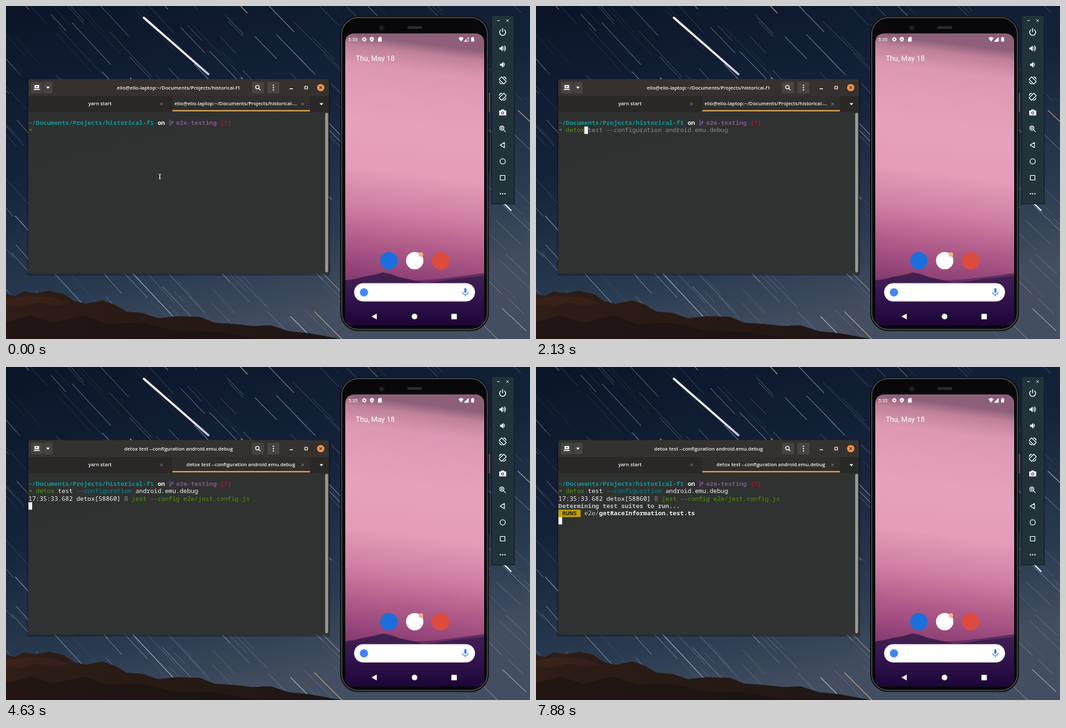
Animation of 800 by 510 pixels, one loop 8 s. Source, as an HTML page:

```html
<!DOCTYPE html>
<html lang="en">
<head>
<meta charset="utf-8">
<title>Terminal and emulator</title>
<style>
  html, body { margin: 0; width: 100%; height: 100%; overflow: hidden; background: #14243a; }
  svg { display: block; width: 800px; height: 510px; }
  text { white-space: pre; }
  .ui { font: 600 7.55px "Open Sans", "Noto Sans", sans-serif; fill: #f4f2f0; text-anchor: middle; }
  .term { font: 9.39px "Noto Sans Mono", "DejaVu Sans Mono", monospace; fill: #f2f2f2; }
  .phone { font-family: Roboto, sans-serif; fill: #fff; }
  .b { font-weight: 700; }
  .path { fill: #0a9a9c; font-weight: 700; }
  .cyan { fill: #06888c; }
  .green { fill: #4e9a06; }
  .red { fill: #cc1414; }
  .git { fill: #83568d; font-weight: 600; }
  .flag { fill: #bd141b; font-weight: 700; }
  .dim { fill: #8a8b8a; }
  .soft { fill: #c3c4c3; }
  .dark { fill: #22200c; }
  .line { fill: none; stroke: #fff; stroke-width: 1.1; stroke-linecap: round; stroke-linejoin: round; }
</style>
</head>
<body>
<svg viewBox="0 0 800 510" xmlns="http://www.w3.org/2000/svg">
  <defs>
    <linearGradient id="sky" x1="0" y1="0" x2="0.4" y2="1">
      <stop offset="0" stop-color="#0a1527"/>
      <stop offset=".45" stop-color="#14233a"/>
      <stop offset=".8" stop-color="#2a3b51"/>
      <stop offset="1" stop-color="#434e60"/>
    </linearGradient>
    <linearGradient id="rock" x1="0" y1="0" x2="1" y2="0">
      <stop offset="0" stop-color="#2f1d16"/>
      <stop offset=".5" stop-color="#271914"/>
      <stop offset="1" stop-color="#1b1516"/>
    </linearGradient>
    <linearGradient id="wall" x1="0" y1="0" x2="-.06" y2="1">
      <stop offset="0" stop-color="#8d5f78"/>
      <stop offset=".035" stop-color="#c08199"/>
      <stop offset=".1" stop-color="#dc98b2"/>
      <stop offset=".3" stop-color="#e7a2bb"/>
      <stop offset=".45" stop-color="#e49cb7"/>
      <stop offset=".58" stop-color="#d080a3"/>
      <stop offset=".7" stop-color="#b05c8a"/>
      <stop offset=".8" stop-color="#924377"/>
      <stop offset=".88" stop-color="#71346a"/>
    </linearGradient>
    <linearGradient id="hill" x1="0" y1="0" x2="0" y2="1">
      <stop offset="0" stop-color="#43224f"/>
      <stop offset=".4" stop-color="#351650"/>
      <stop offset="1" stop-color="#1d0537"/>
    </linearGradient>
    <linearGradient id="meteor" gradientUnits="userSpaceOnUse" x1="210" y1="17" x2="310" y2="105">
      <stop offset="0" stop-color="#fff"/>
      <stop offset=".7" stop-color="#f3eefb"/>
      <stop offset="1" stop-color="#c5c0da"/>
    </linearGradient>
    <clipPath id="screen"><rect x="518" y="42" width="212" height="447" rx="13"/></clipPath>
  </defs>

  <rect width="800" height="510" fill="url(#sky)"/>
  <g id="trails" stroke-linecap="round"></g>
  <path d="M210.500 18L309 104.500" stroke="url(#meteor)" stroke-width="3.2" stroke-linecap="round"/>
  <path d="M745 287L771 313" stroke="#e6e6f2" stroke-width="2" stroke-linecap="round"/>
  <path fill="url(#rock)" d="M0 441L14 444L27 437L45 440L66 436L88 441L104 452L122 456L147 451L165 457L184 468L208 470L232 478L262 475L296 476L318 485L349 487L376 490L404 489L432 498L462 501L490 506L512 510H0Z"/>
  <path fill="#452a1d" opacity=".4" d="M0 449L30 444L70 446L98 455L76 459L49 454L25 461L0 458Z"/>
  <path fill="#120f13" opacity=".45" d="M0 484L38 474L72 485L118 474L155 487L205 485L258 497L325 499L384 510H0Z"/>

  <!-- Terminal window -->
  <rect x="32" y="112" width="463" height="301" rx="4" opacity=".25"/>
  <path d="M34 410V116q0-4 4-4H489q4 0 4 4V410Z" fill="#313231" opacity=".965"/>
  <path d="M34 138V116q0-4 4-4H489q4 0 4 4V138Z" fill="#34312f"/>
  <rect x="34" y="138" width="459" height="24.500" fill="#2a2827"/>
  <rect x="254" y="138" width="210" height="23" fill="#302e2c"/>
  <rect x="254" y="159.500" width="210" height="1.800" fill="#f5b665"/>
  <g fill="#464341">
    <rect x="38" y="116" width="18" height="18" rx="2"/>
    <rect x="57" y="116" width="14" height="18" rx="2"/>
    <rect x="375.500" y="116" width="18.500" height="18" rx="2"/>
    <rect x="399" y="116" width="18.500" height="18" rx="2"/>
  </g>
  <g fill="#fff">
    <path d="M43.500 121h7v5h-7zM42.500 127h9v1.500h-9zM61.200 123.500h5.600l-2.800 3.200zM478.700 148.800h5.600l-2.800 3.200z"/>
    <path d="M46 122.500h2v2h-2z" fill="#464341"/>
    <circle cx="408.300" cy="121.500" r="1.100"/><circle cx="408.300" cy="125" r="1.100"/><circle cx="408.300" cy="128.500" r="1.100"/>
    <path d="M433 126h5v1.300h-5z"/>
  </g>
  <g class="line">
    <circle cx="383.800" cy="124.200" r="2.700"/><path d="M386 126.500l2.200 2.200M456.200 123h4v4h-4z"/>
  </g>
  <circle cx="480.500" cy="125" r="5.600" fill="#f0954a"/>
  <path d="M478.700 123.200l3.600 3.600m0-3.600l-3.600 3.600" stroke="#4b2d14" stroke-width="1.100"/>
  <path d="M235.500 148l4 4m0-4l-4 4M450.800 148l4 4m0-4l-4 4" stroke="#85817e" stroke-width=".9"/>
  <text class="ui" x="143.500" y="152.300">yarn start</text>
  <text class="ui" id="title" x="263.500" y="127.800"></text>
  <text class="ui" id="tab" y="152.300"></text>
  <rect x="487.300" y="163.500" width="4.400" height="244.500" rx="2.200" fill="#9b9b98"/>
  <g class="term" id="term"></g>
  <path id="mouse" d="M233 257.500q1.700 0 1.700 1.200v5q0 1.200-1.700 1.200M236.600 257.500q-1.700 0-1.700 1.200v5q0 1.200 1.700 1.200" fill="none" stroke="#f3f3f3" stroke-width=".9"/>

  <!-- Phone -->
  <rect x="736" y="133" width="2.600" height="30" rx="1" fill="#b0574f"/>
  <rect x="736" y="192" width="2.200" height="63" rx="1" fill="#15161a"/>
  <rect x="511" y="16" width="225.500" height="481" rx="27" fill="#08080a" stroke="#111215" stroke-width="1.600"/>
  <rect x="512.600" y="17.600" width="222.300" height="477.800" rx="25.500" fill="none" stroke="#5a5c60" stroke-width="1.200"/>
  <rect x="612.500" y="31" width="23" height="4" rx="2" fill="#2b2b2d"/>
  <circle cx="573.500" cy="33.500" r="4.500" fill="#17181b"/><circle cx="573.500" cy="33.500" r="1.600" fill="#2d3038"/>
  <g clip-path="url(#screen)">
    <rect x="518" y="42" width="212" height="447" fill="url(#wall)"/>
    <path fill="#5d2f63" d="M518 422Q550 412 584 417T650 419T730 409V489H518Z"/>
    <path fill="url(#hill)" d="M518 420Q533 419 544 415Q562 412 575 408Q588 410 599 415Q618 419 639 424Q662 422 684 418Q708 416 730 413V489H518Z"/>
  </g>
  <g class="phone">
    <text x="522.500" y="53.700" font-size="7.400">5:35</text>
    <text x="534" y="84" font-size="11">Thu, May 18</text>
  </g>
  <g fill="#fff">
    <circle cx="547" cy="51" r="2" fill="none" stroke="#fff" stroke-width="1.500"/>
    <circle cx="547" cy="51" r="3.100" fill="none" stroke="#fff" stroke-width="1" stroke-dasharray="1.620"/>
    <path d="M558.500 47.300l3 1.200v2.400q0 2.700-3 4q-3-1.300-3-4v-2.400zM569.800 47.500h3.700v7h-5.500v-5zM690.800 49.200q4-3.300 7.900 0l-4 5.200zM710.200 48.300h1.300v-.9h1.800v.9h1.300v6.300h-4.400z"/>
    <circle cx="558.500" cy="51" r="1" fill="#a87086"/>
    <path d="M699.700 54.200L706 48v6.200z" fill="none" stroke="#fff" stroke-width=".8"/>
    <path id="signal"/>
    <circle cx="624" cy="390" r="13.300"/>
    <rect x="531.500" y="424.500" width="184.500" height="28" rx="14"/>
    <path d="M558 475.500l8-4.400v8.800zM680 471.500h8.300v8.300H680z"/>
    <circle cx="623.700" cy="475.500" r="4.300"/>
  </g>
  <circle cx="584.500" cy="390" r="13.300" fill="#1b6fdc"/>
  <circle cx="633.500" cy="380.500" r="3.400" fill="#f2b184"/>
  <circle cx="663.500" cy="390" r="13.300" fill="#dd4b3e"/>
  <circle cx="546.500" cy="438.500" r="6.300" fill="#4285f4"/>
  <rect x="699.500" y="432" width="3.600" height="7.600" rx="1.800" fill="#4285f4"/>
  <path d="M697 438q.6 4 4.300 4t4.300-4M701.300 442v2.700" fill="none" stroke="#4285f4" stroke-width="1.200"/>

  <!-- Emulator toolbar -->
  <rect x="741.500" y="14.500" width="34.500" height="288.500" fill="#21323a" stroke="#101a1f"/>
  <g class="line">
    <path d="M750.300 22.300h3M764 20.700l3.200 3.200m0-3.200l-3.200 3.200" stroke-width=".9"/>
    <path d="M755.200 36.800a4.600 4.600 0 1 0 6 0M758.200 34.500v5" stroke-width="1.300"/>
    <path d="M759.800 62.800q1.500 2 0 4.200M761 60.800q3.300 4 0 8.200M760.200 87.700q1.500 2 0 4.200"/>
    <path d="M752.800 112.300l3.800-3.800 7.200 7.200-3.800 3.800zM759.800 108.600q3 .3 3.800 3.400M753.300 116q.7 3 3.900 3.400"/>
    <path d="M763.800 137.300l-3.800-3.800-7.200 7.200 3.800 3.800zM756.800 133.600q-3 .3-3.800 3.400M763.300 141q-.7 3-3.900 3.400"/>
    <circle cx="757" cy="187" r="3.100"/><path d="M759.400 189.400l3 3M755.500 187h3M757 185.500v3"/>
    <path d="M754.500 213l6.500-4v8z"/>
    <circle cx="758.300" cy="238" r="4"/>
    <path d="M754.700 259.500h7v7h-7z"/>
  </g>
  <g fill="#fff">
    <path d="M753.300 63.400h2l3-2.800v8.800l-3-2.800h-2zM754.300 88.400h2l3-2.800v8.800l-3-2.800h-2z"/>
    <path d="M753 160h2.500l1-1.500h3.600l1 1.500h2.500v7.500H753z"/>
    <circle cx="758.300" cy="163.700" r="2.200" fill="#21323a"/><circle cx="758.300" cy="163.700" r="1.200"/>
    <circle cx="754.800" cy="287.500" r="1.100"/><circle cx="758.300" cy="287.500" r="1.100"/><circle cx="761.800" cy="287.500" r="1.100"/>
  </g>
</svg>
<script>
const $ = id => document.getElementById(id);
const LOOP = 8000, X0 = 34.3, Y0 = 173.3, CW = 5.634, RH = 11.3;
const HOME = "elio@elio-laptop:~/Documents/Projects/historical-";
const CMD = "detox test --configuration android.emu.debug";

// Star trails: seeded, a little steeper towards the left
function drawTrails() {
  let seed = 41, out = "";
  const rnd = () => (seed = (seed * 16807) % 2147483647) / 2147483647;
  const tints = ["#d6e0f0", "#9fb3cf", "#e4bf9c", "#8299b8", "#c0cadd"];
  for (let i = 0; i < 290; i++) {
    const x = rnd() * 880 - 70, y = rnd() * 560 - 70, len = 22 + rnd() * 80;
    const a = 0.84 - x * 0.0001 + (rnd() - 0.5) * 0.02;
    const tint = tints[Math.floor(rnd() * tints.length)];
    const op = 0.14 + rnd() ** 3 * 0.65, w = 0.6 + rnd() * 0.7;
    out += `<path d="M${x.toFixed(1)} ${y.toFixed(1)}l${(len * Math.cos(a)).toFixed(1)} ${(len * Math.sin(a)).toFixed(1)}"
      stroke="${tint}" stroke-width="${w.toFixed(2)}" opacity="${op.toFixed(2)}"/>`;
  }
  $("trails").innerHTML = out;
}

const put = (row, col, text, cls = "") =>
  `<text class="${cls}" x="${X0 + col * CW}" y="${Y0 + row * RH + 8.7}">${text}</text>`;
const block = (row, col, cols = 1, fill = "#f7f7f7") =>
  `<rect x="${X0 + col * CW}" y="${Y0 + row * RH}" width="${cols * CW}" height="${RH}" fill="${fill}"/>`;

const PROMPT = put(0, 0, "~/Documents/Projects/historical-f1", "path") + put(0, 35, "on", "b")
  + `<path d="M250.300 174.500v9M250.300 181.500q3.800-.5 3.800-4.500m-1.700 1.500l1.700-2 1.500 2" fill="none" stroke="#83568d" stroke-width="1.200"/>`
  + put(0, 40, "e2e-testing", "git") + put(0, 52, "[?]", "flag") + put(1, 0, "➜", "green b");

// Cursor: [from ms, row, column], row -1 hides it
const CURSOR = [[0, -1, 0], [440, 1, 2], [1060, -1, 0], [1380, 1, 2], [1500, 1, 3], [1630, 1, 4],
  [1750, 1, 5], [1880, 1, 6], [2000, 1, 7], [2750, 1, 46], [3000, 2, 0], [4500, 3, 0], [5130, -1, 0],
  [5250, 3, 33], [5880, -1, 0], [6500, 5, 0], [7130, -1, 0], [7750, 5, 0]];
const KEYS = [1500, 1630, 1750, 1880, 2000];
const ACCEPT = 2750, RUN = 3000;

function command(t) {
  const n = KEYS.filter(k => t >= k).length;
  if (!n) return "";
  if (t < ACCEPT)
    return put(1, 2, CMD.slice(0, n), n < 5 ? "red" : "green") + put(1, 2 + n, CMD.slice(n), "dim");
  return put(1, 2, "detox", "green") + put(1, 8, "test")
    + put(1, 13, "--configuration", "cyan") + put(1, 29, "android.emu.debug");
}

function output(t) {
  let s = "";
  if (t >= 4500) s += put(2, 0, "17:35:33.682 detox[58860]") + put(2, 26, "B", "dim")
    + put(2, 28, "jest --config e2e/jest.config.js", "green");
  if (t >= 5250) s += put(3, 0, "Determining test suites to run...", "soft b");
  if (t >= 6500) s += block(4, 0, 6, "#c4a000") + put(4, 1, "RUNS", "dark b")
    + put(4, 7, "e2e/", "soft") + put(4, 11, "getRaceInformation.test.ts", "b");
  return s;
}

let shown = "";
function draw() {
  const t = performance.now() % LOOP;
  const [, row, col] = CURSOR.filter(c => t >= c[0]).pop();
  const html = PROMPT + command(t) + output(t) + (row < 0 ? "" : block(row, col));
  if (html !== shown) $("term").innerHTML = shown = html;
  const running = t >= RUN;
  $("title").textContent = running ? CMD : HOME + "f1";
  $("tab").textContent = running ? CMD : HOME + "...";
  $("tab").setAttribute("x", running ? 358.5 : 351);
  // The pointer hides while typing
  $("mouse").style.visibility = t < KEYS[0] ? "visible" : "hidden";
  $("signal").setAttribute("d", t < 1380 ? "M699.700 54.200l3.200-3.200v3.200z" : "M699.700 54.200L706 48v6.200z");
  requestAnimationFrame(draw);
}
drawTrails();
draw();
</script>
</body>
</html>
```
